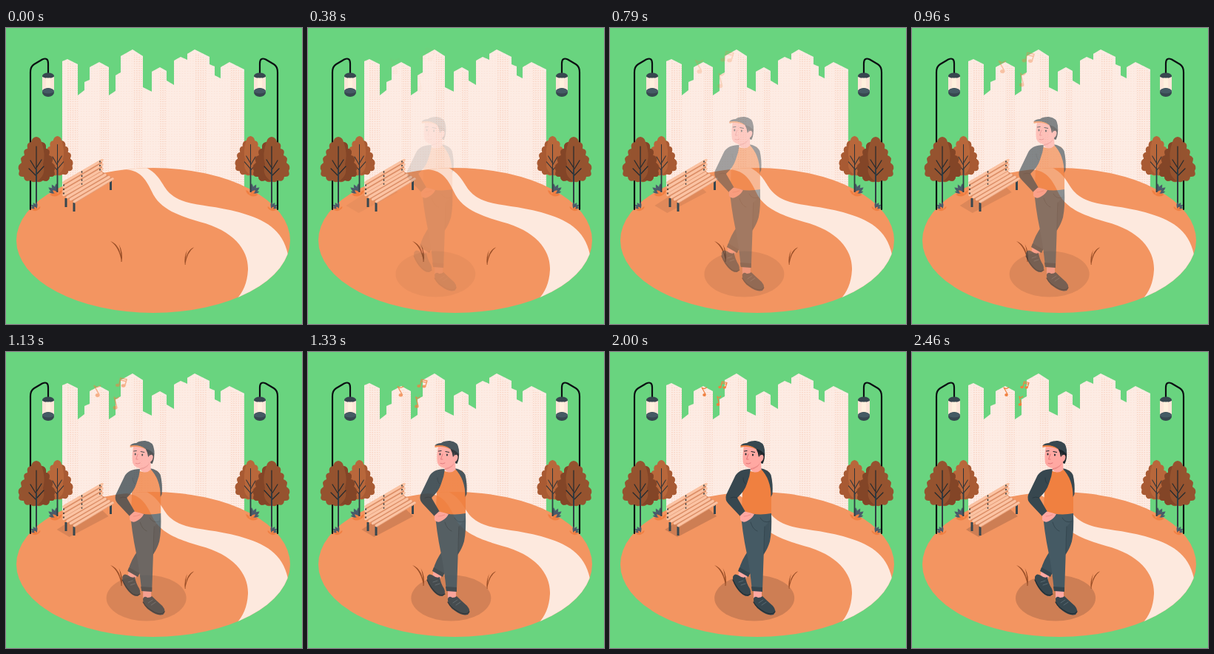
An HTML page that plays this animation: 400x400 px, repeating every 2500 ms.

```html
<!DOCTYPE html>
<html lang="en">
<head>
<meta charset="utf-8">
<title>Walk in the park</title>
<style>
html, body { margin: 0; height: 100%; overflow: hidden; background: #69d47f; }
svg { display: block; width: 100vw; height: 100vh; }
.dark { fill: #37474f; }
.skin { fill: #ffa8a2; }
.line { fill: none; stroke-linecap: round; stroke-linejoin: round; }
</style>
</head>
<body>
<svg viewBox="0 0 400 400">
  <defs>
    <pattern id="windows" width="3.6" height="3.4" patternUnits="userSpaceOnUse">
      <rect width="1.5" height="1" fill="#fbe0d4"/>
    </pattern>
    <pattern id="windowsDense" width="3.2" height="3" patternUnits="userSpaceOnUse">
      <rect width="1.5" height="1.2" fill="#f9d5c5"/>
    </pattern>
    <clipPath id="field"><ellipse cx="199" cy="287" rx="185" ry="98"/></clipPath>
    <path id="skyline" d="M76 45L83 42L97 49V91L106 84V73L113 70V53L126 46L139 53V91L148 85V64L155 60V38L171 29L185 38V80L197 86V59L208 53L217 58V71L227 77V44L236 39L245 43V35L255 29L275 39V49L282 52V64L290 68V53L302 46L322 56V220H76Z"/>
    <path id="crown" d="M41 147Q35 148 34 154Q27 155 29 163Q22 164 25 172Q18 174 21 182Q14 187 18 193Q15 202 24 201Q25 209 33 206Q37 210 41 207Q45 210 50 206Q58 209 59 201Q68 202 65 193Q69 187 62 182Q66 174 58 172Q61 164 54 163Q55 155 48 154Q47 148 41 147Z"/>
    <path id="crownShade" d="M48 154Q55 155 54 163Q61 164 58 172Q66 174 62 182Q69 187 65 193Q68 202 59 201Q58 209 50 206L42 207Q55 198 50 184Q54 170 48 154Z"/>
    <path id="branches" class="line" d="M41 160V207M41 192L33 179M41 200L31 190M41 189L48 178M41 198L51 187"/>
    <path id="leaf" d="M0 0Q-4.500 -7 0 -13Q4.500 -7 0 0"/>
    <g id="bush">
      <g fill="#4a5b6a">
        <use href="#leaf" transform="rotate(-55)"/><use href="#leaf" transform="rotate(-28)"/>
        <use href="#leaf"/><use href="#leaf" transform="rotate(-80) scale(.8)"/>
      </g>
      <g fill="#f07f42">
        <use href="#leaf" transform="translate(3 3) rotate(-85) scale(.9)"/>
        <use href="#leaf" transform="translate(3 3) rotate(-50) scale(.8)"/>
        <use href="#leaf" transform="translate(2 3) rotate(40) scale(.7)"/>
      </g>
    </g>
    <g id="side">
      <path class="line" d="M33 245V60Q33 52 38 49L49 42.500Q57 39 57 48V62" stroke="#0b0f12" stroke-width="2.2"/>
      <ellipse class="dark" cx="57" cy="65" rx="8" ry="4.5"/>
      <path d="M49 66Q57 70 65 66V87H49Z" fill="#fde5d8"/>
      <path d="M54 67.5H60V82H54Z" fill="#fff0dd"/>
      <ellipse cx="57" cy="87" rx="8" ry="6" fill="#37474f"/>
      <ellipse cx="57" cy="85" rx="8" ry="3.6" fill="#455a64"/>
      <use href="#bush" transform="translate(68 223)"/>
      <g transform="translate(35.9 18.2) scale(.82 .87)">
        <use href="#crown" fill="#b8673b"/>
        <use href="#crownShade" fill="#a85a33"/>
        <use href="#branches" stroke="#2b3339" stroke-width="1.2"/>
      </g>
      <path d="M69.5 190V222" stroke="#2f3b42" stroke-width="1.8"/>
      <use href="#crown" fill="#95532f"/>
      <use href="#crownShade" fill="#834527"/>
      <use href="#branches" stroke="#22292e" stroke-width="1.2"/>
      <path d="M41 190V245" stroke="#2f3b42" stroke-width="2"/>
      <use href="#bush" transform="translate(41 244) scale(.7)"/>
    </g>
    <path id="blades" d="M156 316Q153 296 141 288Q155 293 156.500 316ZM155.500 316Q156 302 152.500 292Q158.500 303 156.500 316Z"/>
  </defs>

  <use href="#skyline" fill="#fdece4"/>
  <use href="#skyline" fill="url(#windows)"/>
  <path fill="url(#windowsDense)" d="M83 45L97 51V220H83ZM126 50L139 56V220H126ZM171 33L185 41V220H171ZM208 57L217 61V220H208ZM255 33L272 41V220H255ZM304 51L322 59V220H304Z"/>

  <ellipse cx="199" cy="287" rx="185" ry="98" fill="#f39561"/>
  <path clip-path="url(#field)" fill="#fde9de" d="M160 191C180 192 188 202 197 221C208 246 236 254 262 262C308 274 328 300 327 327C326 345 320 357 312 366L390 370L381 306C374 272 350 259 315 249C285 241 260 240 243 235C215 226 215 212 204 200C199 194 193 190 184 186Z"/>

  <g id="shadows" fill="#cd7e54">
    <ellipse cx="196" cy="332.500" rx="54" ry="31"/>
    <path d="M75 240L92 250L145 222L128 206Z"/>
  </g>

  <use href="#side"/>
  <use href="#side" transform="matrix(-1 0 0 1 400 0)"/>

  <g fill="#9a4f28">
    <use href="#blades"/>
    <use href="#blades" transform="matrix(-.8 0 0 .85 367 51.500)"/>
  </g>

  <g id="bench" class="line">
    <path d="M81 230V242M92 236V248M141.500 206V219" stroke="#37474f" stroke-width="3" stroke-linecap="butt"/>
    <path d="M78 207L130 177V194L144 203L93 236L77 226Z" fill="#dc8e66"/>
    <path d="M78 209L130 178.500M78 215L130 184.500M78 221L130 190.500M78 225.500L129 196M83 228.500L134 198.500M87.500 231.500L139 201.500M92.500 234.500L144 204" stroke="#fbc3a3" stroke-width="3.500"/>
    <path d="M78 212V225M102.500 194V211M127 180V196" stroke="#222b30" stroke-width="1.500" stroke-dasharray="1 4.500"/>
    <path d="M93 236.500L145 205" stroke="#e59b74" stroke-width="1"/>
  </g>

  <g id="notes" fill="#f0803f" stroke="#f0803f">
    <g stroke="none">
      <ellipse cx="127.500" cy="58" rx="2.300" ry="1.900"/>
      <ellipse cx="148.500" cy="47.500" rx="2.200" ry="1.700"/>
      <ellipse cx="154.500" cy="48" rx="2.200" ry="1.700"/>
      <ellipse cx="146" cy="71" rx="2.300" ry="1.900"/>
    </g>
    <path class="line" stroke-width="1.200" d="M129 57L124 48Q127 51 130.500 48M150 47L151.500 40L158 41.500L156 48M151 42L157.500 43.500M147.500 70L145 60Q147 63 149.500 60"/>
  </g>

  <g id="man">
    <path class="skin" d="M175 295L186 301L183 308L173 304ZM194 320H205V333H194Z"/>
    <path class="dark" d="M166 304Q168 298 174 302Q179 306 183 304Q184 312 189 320Q192 327 187 330Q181 331 174 323Q165 312 166 304Z"/>
    <path class="dark" d="M194 333Q196 329 200 332Q204 332 206 330Q212 336 220 343Q226 350 221 355Q213 357 204 350Q193 343 194 333Z"/>
    <path class="line" stroke="#222e34" stroke-width="1.200" d="M166 308Q172 321 180 327Q186 330 190 327M194 338Q198 346 210 352Q219 356 223 351"/>
    <path class="line" stroke="#61737c" stroke-width=".8" d="M174 311L180 309M177 315L183 313M201 339L207 335M205 342L211 338"/>

    <path fill="#3e525c" d="M196 218H218Q219 242 216 256Q213 266 208 273L187 303L174 295Q178 280 188 267Z"/>
    <path fill="#455a64" d="M177 216L218 218Q217 229 209 236L206 323L192 322Q189 293 185 273Q178 240 177 216Z"/>
    <path fill="#34464f" d="M175 291L189 299L187 304L173 296ZM191 317L206 318V324L192 323Z"/>
    <path class="line" stroke="#34464f" stroke-width=".9" d="M209 236Q208 252 208 272M203 224Q207 232 216 229M190 230Q193 240 199 242"/>

    <path fill="#f08040" d="M186 159Q196 166 204 158L214 161L218 175V218Q198 222 178 215L179 186Z"/>
    <path class="dark" d="M203 157Q214 159 217.500 166Q220.500 178 219.500 192L217.500 196Q218 172 203 157Z"/>
    <path class="dark" d="M190 158Q174 158 169 168L157 193Q155 200 160 205L176 222L183 216L172 197Q182 188 185 178Q189 168 190 158Z"/>
    <path class="line" stroke="#26343b" stroke-width=".7" d="M172 197Q167 195 163 197M183 178Q180 176 180 170"/>
    <path class="skin" d="M176 221L182 215.500Q190 217 195 219Q192 225 186 228Q180 232 176 227Z"/>
    <path class="line" stroke="#e37d7a" stroke-width=".6" d="M181 222Q185 222 190 220"/>

    <path fill="#1d262b" d="M200 129L209 133Q210 144 206.500 151L203 150Z"/>
    <path class="skin" d="M190 150L204 146L204.500 159Q197 166 189.500 159Z"/>
    <path fill="#ed8b88" d="M190 156Q198 155 203 148Q202 157 190 159Z"/>
    <path class="skin" d="M181 127Q178.500 141 180 150Q183 157 191 157Q200 155 203 149Q208 146 207.500 141Q206 137 203 140L201 130Z"/>
    <path fill="#1d262b" d="M197 130L203 132L202.500 140L201 142Q200 135 197 130Z"/>
    <path class="line" stroke="#1d262b" stroke-width="1.200" d="M181.500 134L185 133.500M191 134.500L195.500 135.500"/>
    <ellipse cx="183.500" cy="138" rx="1" ry="1.500" fill="#1d262b"/>
    <ellipse cx="193" cy="139" rx="1" ry="1.500" fill="#1d262b"/>
    <path class="line" stroke="#d9656a" stroke-width=".8" d="M187 138L184.500 145H187M184 150.500Q187 152 190 150"/>
    <path class="dark" d="M182 126Q186 119.500 197 120Q208 121 209 132V138Q204 132 197 131Q188 125 177 128Q177 124 182 126Z"/>
    <path fill="#f08040" d="M176.500 126Q187 122.500 198.500 132Q187 126 176.500 129Z"/>
    <path class="dark" d="M176.500 126.500Q179 122.500 187 123Q195 124 199 130.500Q188 124.500 176.500 126.500Z"/>
  </g>
</svg>
<script>
const LOOP = 2500;
const [shadows, notes, man] = ['shadows', 'notes', 'man'].map(id => document.getElementById(id));
const clamp = x => Math.max(0, Math.min(1, x));
const smooth = x => (1 - Math.cos(Math.PI * clamp(x))) / 2;

function pose(el, transform, opacity) {
  el.setAttribute('transform', transform);
  el.setAttribute('opacity', opacity);
}

function draw(now) {
  const t = now % LOOP;
  const enter = clamp(t / 1600);
  const glide = smooth(t / 1670);
  const settle = 2 * clamp((t - 1670) / 800);
  pose(man, `translate(${30 * (enter - 1)} 0)`, glide);
  pose(shadows, `translate(${27 * (glide - 1) - settle} 0)`, enter);
  pose(notes, `translate(140.5 56.5) scale(${2 - enter}) translate(-140.5 -56.5)`, glide * enter);
}

const start = performance.now();
function tick() {
  draw(performance.now() - start);
  requestAnimationFrame(tick);
}
tick();
</script>
</body>
</html>
```
